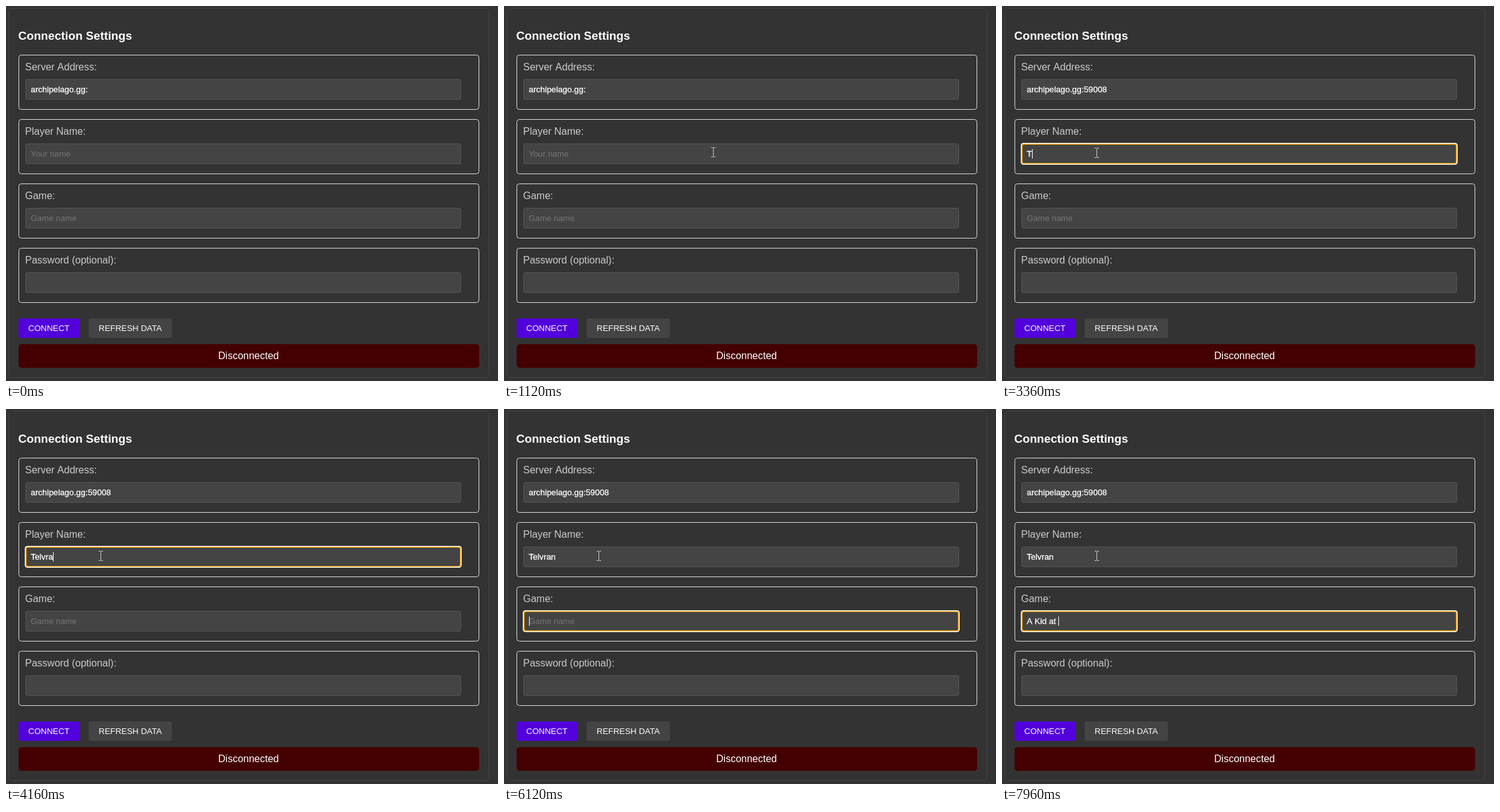
An HTML page with a canvas for the animation above (8000 ms loop, 786 by 600 pixels).

```html
<!DOCTYPE html>
<html lang="en">
<head>
<meta charset="utf-8">
<title>Connection Settings</title>
<style>
  html, body { margin: 0; width: 100%; height: 100%; overflow: hidden; background: #333; }
  canvas { display: block; }
</style>
</head>
<body>
<canvas id="stage" width="786" height="600"></canvas>
<script>
const ctx = document.getElementById('stage').getContext('2d');
const LOOP = 8000;
const BLINK = 530;
const FONT = '"Liberation Sans", Arial, sans-serif';
const SMALL = `13.333px ${FONT}`;
const NORMAL = `16px ${FONT}`;

// keys: moments at which the text grows; focus: [start, end]
const fields = [
  { label: 'Server Address:', hint: '', start: 'archipelago.gg:', typed: '59008',
    keys: [1880, 1880, 1880, 1880, 1880], focus: [1500, 2480] },
  { label: 'Player Name:', hint: 'Your name', start: '', typed: 'Telvran',
    keys: [3300, 3480, 3620, 3780, 3920, 4080, 4240], focus: [2480, 4660] },
  { label: 'Game:', hint: 'Game name', start: '', typed: 'A Kid at ',
    keys: [6480, 6640, 6820, 7040, 7180, 7320, 7500, 7640, 7800], focus: [4660, LOOP] },
  { label: 'Password (optional):', hint: '', start: '', typed: '', keys: [], focus: [LOOP, LOOP] }
];

// Pointer stops: time, x, y
const pointer = [
  [120, 792, 330], [960, 334, 234], [1140, 334, 234], [1460, 180, 134],
  [1960, 180, 134], [2240, 154, 199], [2400, 151, 235], [LOOP, 151, 235]
];

function box(x, y, w, h, r, fill) {
  ctx.beginPath();
  ctx.roundRect(x, y, w, h, r);
  ctx.fillStyle = fill;
  ctx.fill();
}

function outline(x, y, w, h, r, color) {
  ctx.beginPath();
  ctx.roundRect(x + 0.5, y + 0.5, w - 1, h - 1, r);
  ctx.strokeStyle = color;
  ctx.lineWidth = 1;
  ctx.stroke();
}

function text(str, x, y, font, color, align = 'left') {
  ctx.font = font;
  ctx.fillStyle = color;
  ctx.textAlign = align;
  ctx.fillText(str, x, y);
}

function drawField(field, top, t) {
  outline(20, top, 736, 88, 4, '#ddd');
  text(field.label, 30.5, top + 25, NORMAL, '#ccc');

  const [from, to] = field.focus;
  const focused = t >= from && t < to;
  if (focused) {
    box(30, top + 38, 698, 35, 4.5, '#fff');
    box(31.4, top + 39.4, 695.2, 32.2, 3.5, '#e59700');
    box(33, top + 41, 692, 29, 2, '#444');
  } else {
    box(31, top + 39, 696, 33, 3, '#444');
    outline(31, top + 39, 696, 33, 3, '#555');
  }

  const pressed = field.keys.filter(k => k <= t);
  const value = field.start + field.typed.slice(0, pressed.length);
  const base = top + 60;
  if (value) {
    text(value, 39.5, base, SMALL, '#fff');
    ctx.strokeStyle = '#fff';
    ctx.lineWidth = 0.3;
    ctx.strokeText(value, 39.5, base);
  } else {
    text(field.hint, 39.5, base, SMALL, '#757575');
  }

  if (focused) {
    const last = Math.max(from, ...pressed);
    if (Math.floor((t - last) / BLINK) % 2 === 0) {
      ctx.font = SMALL;
      const x = Math.round(39.5 + ctx.measureText(value).width);
      ctx.fillStyle = '#fff';
      ctx.fillRect(x, top + 48, 1, 15);
    }
  }
}

function pointerAt(t) {
  const i = pointer.findIndex(p => p[0] > t);
  if (i < 1) return null;
  const [t0, x0, y0] = pointer[i - 1];
  const [t1, x1, y1] = pointer[i];
  const u = (t - t0) / (t1 - t0);
  const e = u * u * (3 - 2 * u);
  return [Math.round(x0 + (x1 - x0) * e), Math.round(y0 + (y1 - y0) * e)];
}

function drawBeam(x, y) {
  ctx.fillStyle = '#ccc';
  ctx.fillRect(x, y - 7, 1, 14);
  for (const dy of [-8, 7]) {
    ctx.fillRect(x - 3, y + dy, 3, 1);
    ctx.fillRect(x + 1, y + dy, 3, 1);
  }
}

function drawArrow(x, y) {
  const shape = [[0, 0], [0, 17], [4, 13.2], [6.8, 19], [9.4, 17.8], [6.8, 12], [12, 12]];
  ctx.beginPath();
  shape.forEach(([dx, dy]) => ctx.lineTo(x + dx + 0.5, y + dy));
  ctx.closePath();
  ctx.fillStyle = '#fff';
  ctx.fill();
  ctx.strokeStyle = '#111';
  ctx.lineWidth = 0.8;
  ctx.stroke();
}

function drawPointer(t) {
  const pos = pointerAt(t);
  if (!pos) return;
  const [x, y] = pos;
  const row = (y - 78) % 103;
  const overField = x > 31 && x < 727 && y > 78 && y < 460 && row >= 39 && row < 72;
  (overField ? drawBeam : drawArrow)(x, y);
}

function draw(t) {
  ctx.fillStyle = '#333';
  ctx.fillRect(0, 0, 786, 600);
  outline(4, 3, 768, 592, 5, '#444');
  text('Connection Settings', 19.5, 54, `bold 18.72px ${FONT}`, '#fff');
  fields.forEach((field, i) => drawField(field, 78 + i * 103, t));

  box(20, 500, 97, 31, 3, '#5200dc');
  text('CONNECT', 68.5, 520, SMALL, '#fff', 'center');
  box(132, 500, 133, 31, 3, '#444');
  text('REFRESH DATA', 198.5, 520, SMALL, '#fff', 'center');
  box(20, 541, 736, 38, 5, '#440000');
  text('Disconnected', 387.5, 565, NORMAL, '#fff', 'center');
  drawPointer(t);
}

function frame() {
  draw(performance.now() % LOOP);
  requestAnimationFrame(frame);
}
frame();
</script>
</body>
</html>
```
